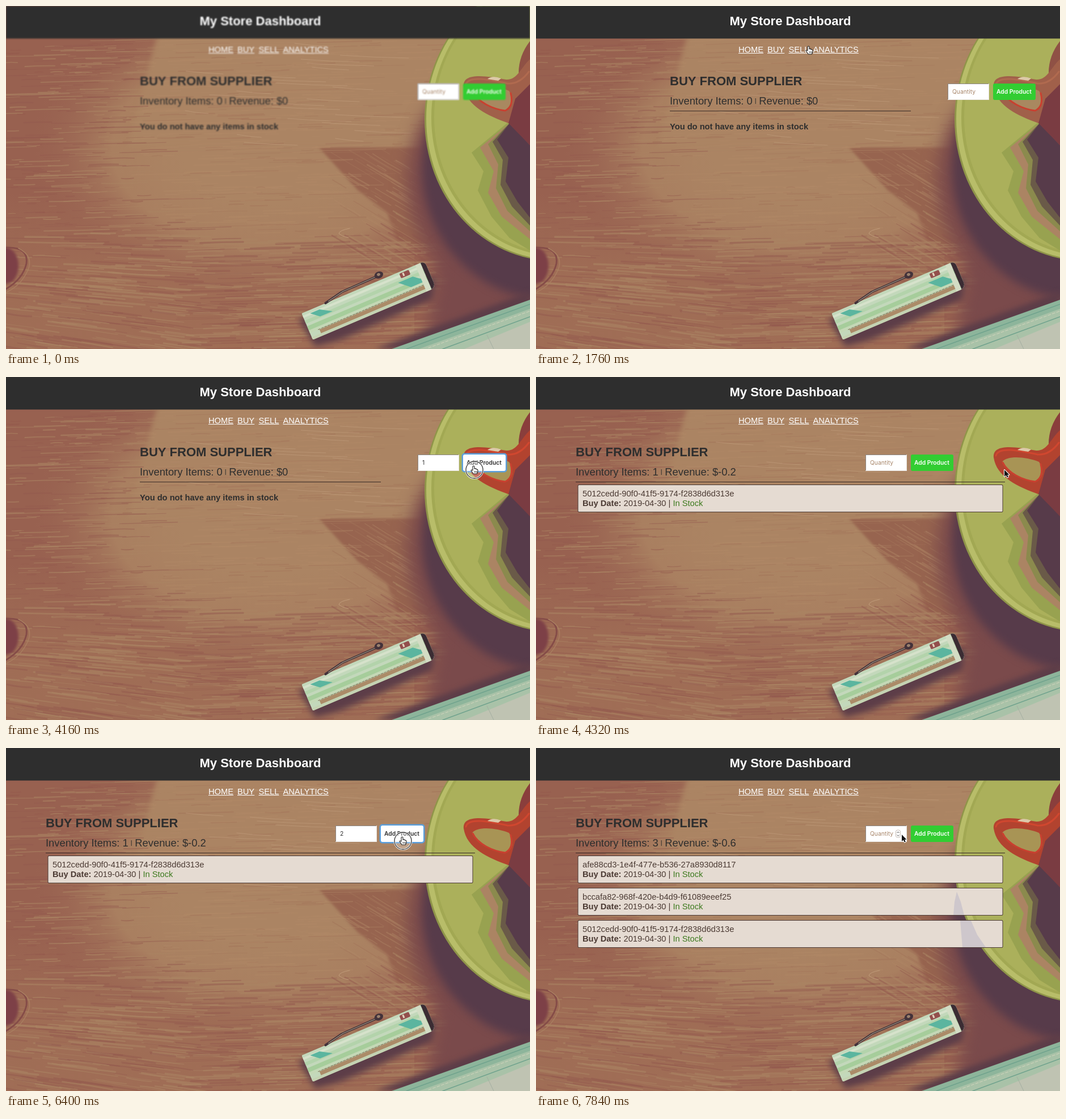
These frames come from a looping animation (924 by 606 pixels, 8000 ms). An HTML page with a canvas:

```html
<!DOCTYPE html>
<html lang="en">
<head>
<meta charset="utf-8">
<title>My Store Dashboard</title>
<style>
html, body { margin: 0; width: 100%; height: 100%; overflow: hidden; background: #986150; }
canvas { display: block; }
</style>
</head>
<body>
<canvas id="stage" width="924" height="606"></canvas>
<script>
const W = 924, H = 606, LOOP = 8000, STEP = 160;
const SANS = '"Liberation Sans", Arial, sans-serif', UI = 'Inter, "Open Sans", sans-serif';
const INK = '#2e2e2e';
const stage = document.getElementById('stage').getContext('2d');
let c = stage;

function fill(color, d) { c.fillStyle = color; c.fill(new Path2D(d)); }
function line(color, width, d) { c.strokeStyle = color; c.lineWidth = width; c.stroke(new Path2D(d)); }
function rect(color, x, y, w, h, r = 0) {
  c.fillStyle = color;
  c.beginPath(); c.roundRect(x, y, w, h, r); c.fill();
}
function ellipse(color, x, y, rx, ry) {
  c.fillStyle = color;
  c.beginPath(); c.ellipse(x, y, rx, ry, 0, 0, 7); c.fill();
}
// Draws text and returns its right edge.
function text(s, x, y, size, color, weight = 400, family = SANS) {
  c.font = `${weight} ${size}px ${family}`;
  c.fillStyle = color;
  c.fillText(s, x, y);
  return x + c.measureText(s).width;
}
function blurred(px, draw) { c.filter = `blur(${px}px)`; draw(); c.filter = 'none'; }

// ---- Desk backdrop ----
function wood() {
  let seed = 11;
  const rnd = () => (seed = (seed * 16807) % 2147483647) / 2147483647;
  rect('#986150', 0, 0, W, H);
  const low = c.createLinearGradient(0, 330, 0, 480);
  low.addColorStop(0, '#a3735800');
  low.addColorStop(1, '#a37358aa');
  rect(low, 0, 330, 720, 276);
  c.save();
  c.translate(470, 250); c.scale(1.6, 1);
  const glow = c.createRadialGradient(0, 0, 100, 0, 0, 270);
  glow.addColorStop(0, '#ab8463');
  glow.addColorStop(.45, '#a97f60');
  glow.addColorStop(1, '#98615000');
  rect(glow, -300, -300, 600, 700);
  c.restore();
  blurred(4, () => fill('#ab8463', 'M270 40H790L735 248H215Z'));
  blurred(2, () => fill('#97644f', 'M552 250H750V430L690 414L672 365L620 325Z'));
  c.lineCap = 'round';
  for (let i = 0; i < 1500; i++) {
    const x = rnd() * 780 - 20, y = 60 + rnd() * 546;
    const top = y < 245 && x > 215, low = y > 400;
    const core = top || Math.hypot((x - 470) / 250, (y - 300) / 110) < 1;
    const len = 12 + rnd() * rnd() * 150 + (low ? 30 : 0);
    const slope = low && x < 300 ? .14 * (y - 400) / 170 : x > 570 && y > 250 && y < 420 ? .6 : -.025;
    const tan = rnd() < (core ? .7 : low ? .58 : .5);
    const tone = core ? (tan ? '#b18a6866' : '#a0725877') : (tan ? '#ab846399' : '#93594e77');
    line(tone, .6 + rnd() * (low ? 3 : 1.8),
      `M${x} ${y}q${len / 2} ${slope * len / 2 - 2 + rnd() * 4} ${len} ${slope * len}`);
  }
  for (let i = 0; i < 26; i++) {
    const x = 300 + rnd() * 340, y = 66 + i * 7, len = 40 + rnd() * 90;
    line('#c19d7baa', 1, `M${x} ${y}q${len / 2} 4 ${len} 5`);
  }
  line('#c19d7b', 1, 'M606 393Q588 396 587 402Q592 407 604 409');
  blurred(2, () => ellipse('#7d4047', 0, 459, 22, 32));
  line('#854c48', 3, 'M0 427Q40 425 36 455Q30 482 0 500');
  line('#a97e60', 1.5, 'M22 428Q50 442 38 468Q26 494 2 505');
}

function plate(bright) {
  blurred(14, () => {
    ellipse('#7a4a4b', 955, 310, 248, 235);
    fill('#7a4a4b', 'M770 430H930V570L740 606L750 520Z');
  });
  blurred(8, () => ellipse('#573b4a', 962, 288, 228, 232));
  ellipse('#8f9549', 965, 200, 227, 250);
  ellipse('#b8bd69', 967, 199, 226, 249);
  ellipse('#a2a853', 971, 197, 221, 244);
  ellipse('#abb05b', 974, 196, 219, 241);
  // Shadow bands thrown across the plate by the cup
  fill('#98a250', 'M887 204L821 259L842 292L832 326L856 372L888 410L924 432V200Z');
  fill('#ab8463', 'M889 206L836 250L860 292L850 330L874 372L924 412V206Z');
  fill('#8b8a4d', 'M889 206L850 244L868 280L864 322L884 362L924 398V206Z');
  fill('#6a5a48', 'M889 206L858 240L876 272L872 316L892 354L924 388V206Z');
  fill('#573b4a', 'M889 206L866 236L886 268L881 310L902 346L924 374V200Z');
  // Cup and handle
  const body = bright ? '#8a3e3c' : '#8f5145', handle = bright ? '#b2432f' : '#a0604a';
  fill(body, 'M924 62Q904 88 904 118L912 160L886 206L924 246Z');
  fill(handle, 'M807 142C805 117 845 123 882 130C902 131 908 108 924 94V170L886 207C850 194 812 177 807 142Z');
  line(bright ? '#d0472f' : '#b06a4f', 3, 'M811 139C815 123 850 129 885 137Q906 138 922 116');
  fill(bright ? '#a89455' : '#a98860', 'M822 150C830 139 862 140 887 150C897 166 894 180 880 185C855 182 830 167 822 150Z');
  line('#c9402f', 3, 'M823 151C832 170 858 182 880 185Q896 178 890 154');
  fill('#7a3c42', 'M898 164L924 138V246L886 207Z');
  fill('#dcc9a9', 'M849 129Q858 122 873 128L868 132Z');
}

function pen() {
  blurred(6, () => fill('#5c3d48', 'M516 553L545 602L590 590L752 518L758 480L700 480Z'));
  c.save();
  c.translate(521, 543); c.rotate(-.402);
  c.save();
  c.beginPath(); c.roundRect(0, 0, 236, 51, [2, 8, 10, 3]); c.clip();
  rect('#c3d8bb', 0, 0, 236, 51);
  rect('#d6e2cb', 0, 5, 236, 4);
  rect('#b3d3ab', 0, 14, 236, 6);
  rect('#a6cd9b', 0, 25, 236, 8);
  rect('#c4d8b6', 0, 33, 236, 5);
  rect('#ab8b68', 18, 39, 206, 7);
  rect('#c4d2b2', 0, 46, 236, 5);
  fill('#5bb59f', 'M14 6H32L52 18H28ZM178 17H206L226 33H196Z');
  c.setLineDash([4, 2]);
  line('#7d7258', 1, 'M16 38H220');
  c.setLineDash([]);
  rect('#d3dcc4', 218, 0, 9, 51);
  rect('#3b2c33', 228, 0, 8, 51);
  rect('#934f4c', 186, 3, 18, 9, 2);
  rect('#e2d2bd', 191, 4, 3, 6);
  c.restore();
  line('#43323a', 4, 'M46 0L80 -7L152 -8');
  line('#a69b83', 1, 'M52 -1L82 -7L146 -8');
  ellipse('#43323a', 152, -9, 8, 6);
  ellipse('#9b806d', 152, -10, 3, 2.5);
  c.restore();
}

function notebook() {
  blurred(5, () => fill('#5c3d48', 'M650 606L924 505V540L720 606Z'));
  fill('#8db59b', 'M680 606L924 519V606Z');
  fill('#a9c2a8', 'M728 606L924 535V606Z');
  fill('#bfc3b2', 'M808 606L924 558V606Z');
  line('#6fa28d', 1.5, 'M706 606L924 527M770 606L924 549');
  c.setLineDash([5, 3]);
  line('#d2d5bd', 1, 'M745 604L924 539');
  c.setLineDash([]);
  line('#a4afa1', 1, 'M848 581L860 606');
}

function backdrop(bright) {
  const canvas = document.createElement('canvas');
  canvas.width = W; canvas.height = H;
  c = canvas.getContext('2d');
  wood(); plate(bright); notebook(); pen();
  c = stage;
  return canvas;
}
const desks = [backdrop(false), backdrop(true)];

// ---- Pointer ----
const path = [
  [1280, 384, 78], [1760, 482, 78], [2080, 572, 98], [2400, 706, 146], [2720, 766, 155],
  [3360, 766, 155], [4000, 822, 163], [4160, 826, 164], [4800, 826, 164], [5120, 641, 160],
  [5280, 622, 157], [6080, 622, 157], [6400, 700, 164], [7360, 700, 164], [7840, 645, 153]
];
const clicks = [2880, 4160, 5280, 6400];

function pointerAt(t) {
  const i = path.findIndex(p => p[0] > t);
  if (i === 0) return null;
  if (i < 0) return path.at(-1).slice(1);
  const [t0, x0, y0] = path[i - 1], [t1, x1, y1] = path[i];
  const k = (t - t0) / (t1 - t0);
  return [x0 + (x1 - x0) * k, y0 + (y1 - y0) * k];
}

function pointer(x, y, kind, click) {
  c.save();
  c.translate(x, y);
  c.lineJoin = 'round';
  if (click) {
    ellipse('#ffffff40', 0, 0, 15, 15);
    c.beginPath(); c.arc(0, 0, 15, 0, 7);
    c.strokeStyle = '#fff'; c.lineWidth = 3; c.stroke();
    c.strokeStyle = '#333'; c.lineWidth = 1.3; c.stroke();
  }
  if (kind === 'hand') {
    const d = 'M-3 -6Q-1.500 -8 0 -6V-2Q2 -3 2.500 -1.500Q4 -2 4.500 -.5Q6 -1 6 1V3Q5 5 4.500 7H-2L-6 1Q-6 -1 -3 1Z';
    fill('#fff', d);
    line('#222', 1.1, d);
    line('#222', .8, 'M0 2V5M2 2V5M4 2V5');
  } else if (kind === 'beam') {
    const d = 'M-3 -6.500Q0 -6.500 0 -4V4Q0 6.500 -3 6.500M3 -6.500Q0 -6.500 0 -4M0 4Q0 6.500 3 6.500M-1.500 2H1.500';
    line('#ffffffaa', 2.6, d);
    line('#222', 1.2, d);
  } else {
    const d = 'M0 0V12L2.800 9.500L4.800 13.500L6.800 12.500L5 8.700H8.500Z';
    line('#fff', 2, d);
    fill('#111', d);
  }
  c.restore();
}

// ---- Page ----
const ids = [
  'afe88cd3-1e4f-477e-b536-27a8930d8117',
  'bccafa82-968f-420e-b4d9-f61089eeef25',
  '5012cedd-90f0-41f5-9174-f2838d6d313e'
];

function header() {
  rect(INK, 0, 0, W, 57.5);
  text('My Store Dashboard', 341.5, 34, 22, '#fff', 700);
  [['HOME', 357], ['BUY', 408], ['SELL', 445.5], ['ANALYTICS', 488.5]].forEach(([s, x]) => {
    const end = text(s, x, 82, 14.67, '#fff');
    rect('#fff', x, 83, end - x, 1);
  });
}

function field(x, value, focus, hover, caret) {
  if (focus) rect('#5b9fdc', x - 2, 134.5, 76, 33, 3);
  else {
    rect('#e8e4e0', x, 137, 73, 29);
    rect('#8d8783', x, 137, 72, 28);
  }
  rect('#fff', x + 1, 138, 71, 27);
  const end = value ? text(value, x + 8, 155, 10.3, INK, 400, UI) : x + 8;
  if (!value) text('Quantity', x + 8, 155, 10.3, '#a8866a', 400, UI);
  if (caret) rect('#222', end, 145, 1, 12);
  if (focus || hover) {
    c.beginPath(); c.roundRect(x + 53.5, 145, 8, 13, 3);
    c.strokeStyle = '#c4bbb4'; c.lineWidth = 1; c.stroke();
    line('#444', 1, `M${x + 55.5} 150l2 -2l2 2M${x + 55.5} 153.500l2 2l2 -2`);
  }
}

function button(x, hover, pressed) {
  if (pressed) rect('#5b9fdc', x - 2.5, 134.5, 80, 34, 5);
  rect(hover ? '#fff' : '#32cd32', x, 137, 75, 29, 3);
  text('Add Product', x + 6, 155, 10.3, hover ? INK : '#fff', 600, UI);
}

function card(id, y) {
  rect('#4b3a36', 73.5, y, 750, 49, 2.5);
  rect('#e5dbd2', 74.5, y + 1, 748, 47, 1.5);
  if (y === 247) fill('#cec7cc', 'M742 254L749 272L755 295H736L738 272Z');
  if (y === 304) fill('#cec7cc', 'M748 305H767L778 330L793 352H752Z');
  text(id, 82, y + 21, 14.67, '#4b3a33');
  let x = text('Buy Date:', 82, y + 37.5, 14.67, '#4b3a33', 700);
  x = text(' 2019-04-30 | ', x, y + 37.5, 14.67, '#4b3a33');
  text('In Stock', x, y + 37.5, 14.67, '#3d7a1e');
}

function draw(now) {
  const t = Math.floor(now % LOOP / STEP) * STEP;
  const within = (a, b) => t >= a && t < b;
  const count = t < 4320 ? 0 : t < 6560 ? 1 : 3;
  const left = count ? 70 : 236, fieldX = count ? 581 : 726, buttonX = fieldX + 80;
  const value = within(3360, 4320) ? '1' : within(6080, 6560) ? '2' : '';
  const focus = within(2880, 4160) || within(5280, 6400);
  const caret = focus && !within(5760, 6080);
  const at = pointerAt(t);
  const over = (x, w) => at && at[0] >= x && at[0] <= x + w && at[1] > 137 && at[1] < 166;
  const onField = over(fieldX, 73), onButton = over(buttonX, 75);
  const onNav = at && at[1] < 86 && at[0] < 569;

  c.drawImage(desks[+(t >= 3360)], 0, 0);
  // The page opens soft, then snaps into focus.
  c.filter = t < 320 ? 'blur(1.1px)' : 'none';
  header();
  text('BUY FROM SUPPLIER', left, 140, 22, INK, 700);
  const end = text('Inventory Items: ' + count, left, 173.5, 18.33, INK);
  rect(INK, end + 5, 163, 1, 10);
  const revenue = count ? '-' + (count * .2).toFixed(1) : '0';
  text('Revenue: $' + revenue, end + 11.7, 173.5, 18.33, INK);
  if (t >= 320) rect('#3a2c28', left, 185, count ? 757 : 425, 1);
  if (count) ids.slice(-count).forEach((id, i) => card(id, 190 + i * 57));
  else text('You do not have any items in stock', left, 218, 14.67, INK, 700);
  field(fieldX, value, focus, onField, caret);
  button(buttonX, onButton, onButton && clicks.includes(t));
  c.filter = 'none';

  if (at) {
    const kind = onNav || onButton ? 'hand' : over(fieldX, 62) ? 'beam' : 'arrow';
    pointer(...at, kind, clicks.includes(t));
  }
}

const start = performance.now();
function tick() {
  draw(performance.now() - start);
  requestAnimationFrame(tick);
}
tick();
</script>
</body>
</html>
```
